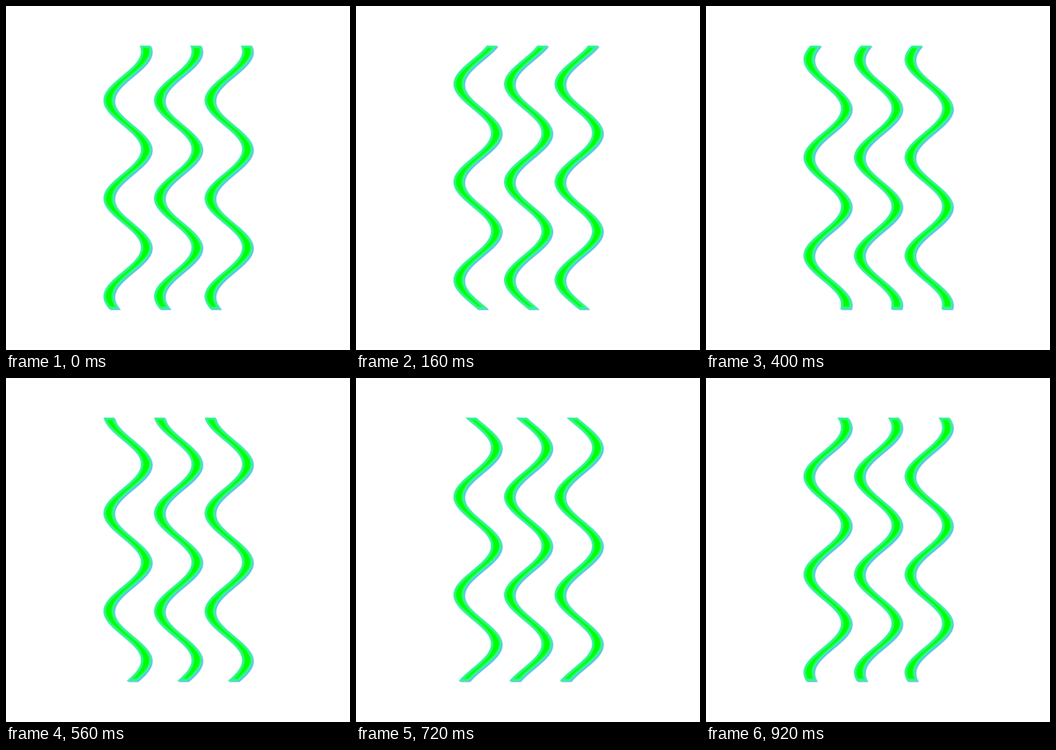
An HTML page with a canvas for the animation above (960 ms loop, 600 by 600 pixels).

```html
<!DOCTYPE html>
<html lang="en">
<head>
<meta charset="utf-8">
<title>Waves</title>
<style>
  html, body { margin: 0; width: 100%; height: 100%; overflow: hidden; background: #fff; }
  canvas { display: block; }
</style>
</head>
<body>
<canvas width="600" height="600"></canvas>
<script>
const ctx = document.querySelector('canvas').getContext('2d');
const TOP = 69, BOTTOM = 528.5, PERIOD = 171, AMPLITUDE = 32.7, HALF_WIDTH = 9.2;
const STEP_MS = 40, STEPS = 24;
const CENTERS = [212, 300.2, 388.4];

function ribbon(cx, trough) {
  const path = new Path2D();
  const x = y => cx - AMPLITUDE * Math.cos(2 * Math.PI * (y - trough) / PERIOD);
  for (let y = TOP; y <= BOTTOM; y += 1.5) path.lineTo(x(y) - HALF_WIDTH, y);
  path.lineTo(x(BOTTOM) - HALF_WIDTH, BOTTOM);
  for (let y = BOTTOM; y >= TOP; y -= 1.5) path.lineTo(x(y) + HALF_WIDTH, y);
  path.lineTo(x(TOP) + HALF_WIDTH, TOP);
  path.closePath();
  return path;
}

function drawRibbon(path) {
  ctx.save();
  ctx.fillStyle = '#0f0';
  ctx.shadowColor = 'rgba(0, 140, 255, .65)';
  ctx.shadowOffsetX = ctx.shadowOffsetY = 1.8;
  ctx.shadowBlur = 1.5;
  ctx.fill(path);

  // Soft aqua rim, strongest at the outline
  ctx.shadowColor = 'transparent';
  ctx.clip(path);
  ctx.strokeStyle = 'rgba(80, 240, 215, .27)';
  for (let width = 2; width <= 10; width += 2) {
    ctx.lineWidth = width;
    ctx.stroke(path);
  }
  ctx.restore();
}

function draw() {
  const step = Math.floor(performance.now() / STEP_MS) % STEPS;
  const trough = 164.5 - PERIOD * step / STEPS;
  ctx.clearRect(0, 0, 600, 600);
  for (const cx of CENTERS) drawRibbon(ribbon(cx, trough));
  requestAnimationFrame(draw);
}
draw();
</script>
</body>
</html>
```
